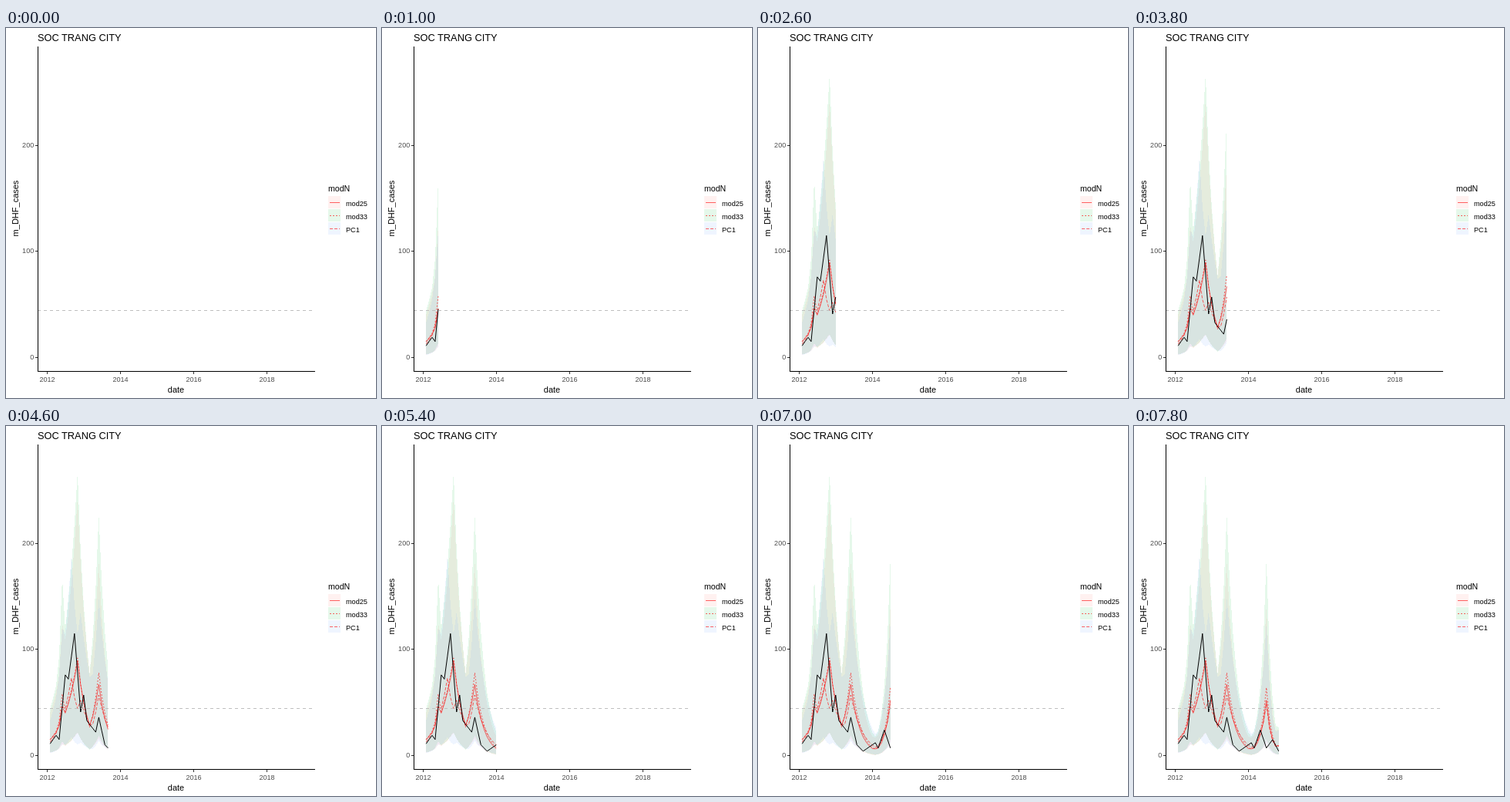
Animation, 480 px wide and 480 px high, one loop 8 s. Source, as an HTML page:

```html
<!DOCTYPE html>
<html lang="en">
<head>
<meta charset="utf-8">
<title>Monthly cases</title>
<style>
  html, body { margin: 0; width: 100%; height: 100%; overflow: hidden; background: #fff; }
  svg { display: block; width: 100%; height: 100%; }
  text { font-family: "Liberation Sans", Arial, sans-serif; font-size: 11px; }
  .small { font-size: 9.1px; }
  .tick { fill: #4d4d4d; }
  .band, line, rect { shape-rendering: crispEdges; }
  path { fill: none; }
  .fit { stroke: red; stroke-opacity: 0.6; }
</style>
</head>
<body>
<svg id="stage" viewBox="0 0 480 480"></svg>
<script>
const LOOP = 8000, STEP = 200, MONTHS = 34;
const FIRST_DAY = 31, DAY_SPAN = 2526, LAST_STEP = 99;

// Each season: month of the peak, height, rise and fall in months
const models = [
  { name: "mod25", fill: "#f8766d", dash: "none", top: 2.72,
    seasons: [[4, 46, 2, 2.8], [9, 89, 5, 3.5], [16, 67, 3.3, 3], [29, 52, 2, 1.6]] },
  { name: "mod33", fill: "#00ba38", dash: "2 2", top: 2.9,
    seasons: [[4, 58, 1.7, 2.5], [9, 92, 5, 3.2], [16, 78, 2.8, 3], [29, 64, 1.9, 1.6]] },
  { name: "PC1", fill: "#619cff", dash: "4 2", top: 2.6,
    seasons: [[4, 46, 2.2, 6], [7, 73, 4, 3.5], [10, 52, 6, 5], [16, 57, 3, 4], [29, 48, 2.4, 1.6]] }
];

// Turning points of the observed cases: month, value
const turns = [[0, 11], [2, 19], [3, 15], [5, 76], [6, 72], [8, 115], [10, 41], [11, 57], [12, 33],
  [15, 22], [16, 36], [18, 10], [20, 4], [24, 12], [25, 7], [27, 24], [29, 7], [31, 15], [33, 4]];

const svg = document.getElementById("stage");
function add(tag, attrs, text) {
  const el = document.createElementNS("http://www.w3.org/2000/svg", tag);
  for (const k in attrs) el.setAttribute(k, attrs[k]);
  if (text) el.textContent = text;
  return svg.appendChild(el);
}
const line = (x1, y1, x2, y2, attrs) => add("line", { x1, y1, x2, y2, ...attrs });
const perMonth = fn => Array.from({ length: MONTHS }, (_, m) => fn(m));
const dayOf = (year, month) => (Date.UTC(year, month, 1) - Date.UTC(2012, 0, 1)) / 864e5;
const px = day => 53.2 + day * 0.13;
const py = v => 427.4 - v * 1.375;

function between(keys, m) {
  const i = Math.max(1, keys.findIndex(k => k[0] >= m));
  const [a, va] = keys[i - 1], [b, vb] = keys[i];
  return va + (vb - va) * (m - a) / (b - a);
}
function seasonal(seasons, m) {
  const floor = 8.5 + 2.5 * Math.cos(2 * Math.PI * m / 42);
  const levels = seasons.map(([peak, height, rise, fall]) =>
    height * Math.exp(m < peak ? (m - peak) / rise : (peak - m) / fall));
  return Math.max(floor, ...levels);
}

const days = perMonth(m => dayOf(2012, 1 + m));
const cases = perMonth(m => between(turns, m));
for (const model of models) model.mean = perMonth(m => seasonal(model.seasons, m));

// Each month lands on the nearest animation step
const steps = days.map(d => Math.round((d - FIRST_DAY) / DAY_SPAN * LAST_STEP));

// Values up to a step, the last one interpolated between months
function upTo(list, step) {
  const out = list.filter((_, i) => steps[i] <= step);
  const n = out.length;
  if (n < list.length && steps[n - 1] < step) {
    const f = (step - steps[n - 1]) / (steps[n] - steps[n - 1]);
    out.push(list[n - 1] + (list[n] - list[n - 1]) * f);
  }
  return out;
}

for (const m of models) m.band = add("path", { class: "band", style: "fill:" + m.fill, "fill-opacity": 0.1 });
for (const m of models) m.line = add("path", { class: "fit", "stroke-dasharray": m.dash });
const caseLine = add("path", { stroke: "#000" });

line(41, 366.5, 399, 366.5, { stroke: "#bebebe", "stroke-dasharray": "4 4" });
line(41.5, 24, 41.5, 446, { stroke: "#000" });
line(41, 445.5, 401, 445.5, { stroke: "#000" });
for (const v of [0, 100, 200]) {
  const y = Math.floor(py(v)) + 0.5;
  line(38, y, 41, y, { stroke: "#333" });
  add("text", { x: 36.3, y: y + 2.8, "text-anchor": "end", class: "small tick" }, String(v));
}
for (const year of [2012, 2014, 2016, 2018]) {
  const x = Math.floor(px(dayOf(year, 0))) + 0.5;
  line(x, 446, x, 449, { stroke: "#333" });
  add("text", { x, y: 459, "text-anchor": "middle", class: "small tick" }, String(year));
}
add("text", { x: 41, y: 17, style: "font-size:12.8px" }, "SOC TRANG CITY");
add("text", { x: 220.5, y: 473, "text-anchor": "middle" }, "date");
add("text", { transform: "translate(15.5 234) rotate(-90)", "text-anchor": "middle" }, "m_DHF_cases");
add("text", { x: 418, y: 212, style: "font-size:10.6px" }, "modN");
models.forEach((m, i) => {
  const y = 218 + i * 17;
  add("rect", { x: 418, y, width: 16, height: 16, fill: m.fill, "fill-opacity": 0.1 });
  line(420, y + 8.5, 433, y + 8.5, { class: "fit", "stroke-dasharray": m.dash });
  add("text", { x: 441, y: y + 13, class: "small" }, m.name);
});

function draw(ms) {
  const step = Math.floor((ms % LOOP) / STEP);
  const xs = upTo(days, step);
  const points = vs => xs.map((d, i) => px(d).toFixed(2) + " " + py(vs[i]).toFixed(2));
  const path = vs => xs.length > 1 ? "M" + points(vs).join("L") : "";
  caseLine.setAttribute("d", path(upTo(cases, step)));
  for (const m of models) {
    const mean = upTo(m.mean, step);
    m.line.setAttribute("d", path(mean));
    const low = points(mean.map(v => Math.max(0.5, v * 0.25 - 1))).reverse();
    const high = path(mean.map(v => v * m.top));
    m.band.setAttribute("d", high && high + "L" + low.join("L") + "Z");
  }
}

const start = performance.now();
function tick() {
  draw(performance.now() - start);
  requestAnimationFrame(tick);
}
draw(0);
requestAnimationFrame(tick);
</script>
</body>
</html>
```
